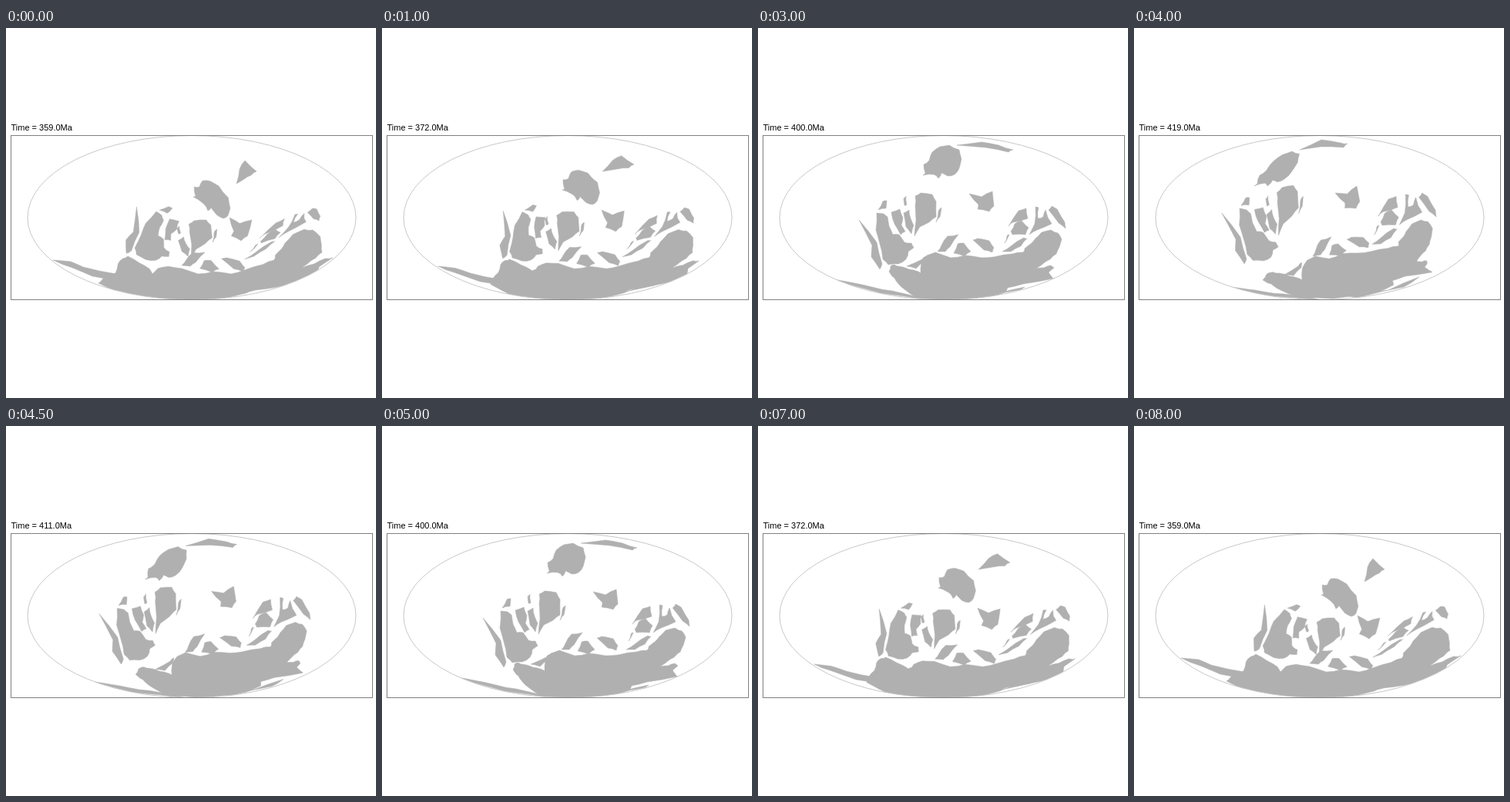
These frames come from a looping animation (480x480 px, 8.5 s). An HTML page:

```html
<!DOCTYPE html>
<html lang="en">
<head>
<meta charset="utf-8">
<style>
html, body { margin: 0; width: 100%; height: 100%; overflow: hidden; background: #fff; }
svg { display: block; width: 480px; height: 480px; }
text { font: 11px Arial, "Liberation Sans", sans-serif; }
</style>
</head>
<body>
<svg viewBox="0 0 480 480">
  <clipPath id="globe"><ellipse cx="241" cy="246" rx="213" ry="106.5"/></clipPath>
  <text id="label" x="6.5" y="133"></text>
  <g id="land" clip-path="url(#globe)" fill="#b0b0b0" stroke="#b0b0b0" stroke-width=".5" stroke-linejoin="round"></g>
  <ellipse cx="241" cy="246" rx="213" ry="106.5" fill="none" stroke="#c8c8c8"/>
  <rect x="6.5" y="139.5" width="469" height="213" fill="none" stroke="#808080"/>
</svg>
<script>
const STEP = 500;
const AGES = [359, 366, 372, 383, 389, 393, 400, 411, 419];
const YOUNG = AGES[0], MIDDLE = 400, OLD = AGES[8];

const land = document.getElementById("land");
const label = document.getElementById("label");
const shapes = [];

const parse = s => s.split(" ").map(p => p.split(",").map(Number));
const mix = (a, b, u) => a.map((v, i) => v + (b[i] - v) * u);

// Fixed pseudo-random offset in -1..1 for rough coasts.
function noise(n) {
  const s = Math.sin(n * 12.9898) * 43758.5453;
  return (s - Math.floor(s)) * 2 - 1;
}

function add(young, middle, old) {
  const el = document.createElementNS("http://www.w3.org/2000/svg", "polygon");
  land.append(el);
  shapes.push({ el, young, middle, old });
}

// Outline whose evenly spaced control points are moved; the rest follow.
function bend(outline, young, old) {
  const mid = parse(outline);
  const follow = text => {
    const ctrl = parse(text), gap = mid.length / ctrl.length;
    const shift = ctrl.map((p, i) => p.map((v, k) => v - mid[i * gap][k]));
    return mid.map((p, i) => {
      const c = Math.floor(i / gap);
      const d = mix(shift[c], shift[(c + 1) % shift.length], i % gap / gap);
      return [p[0] + d[0], p[1] + d[1]];
    });
  };
  add(follow(young), mid, follow(old));
}

// Plate moved as a whole by three anchors.
function plate(anchors, young, old, ...outlines) {
  const [a, b, c] = parse(anchors);
  const det = (b[0] - a[0]) * (c[1] - a[1]) - (b[1] - a[1]) * (c[0] - a[0]);
  const carry = text => {
    const [A, B, C] = parse(text);
    return ([x, y]) => {
      const u = ((x - a[0]) * (c[1] - a[1]) - (y - a[1]) * (c[0] - a[0])) / det;
      const v = ((b[0] - a[0]) * (y - a[1]) - (b[1] - a[1]) * (x - a[0])) / det;
      return A.map((p, k) => p + u * (B[k] - p) + v * (C[k] - p));
    };
  };
  for (const o of outlines) {
    const mid = parse(o);
    add(mid.map(carry(young)), mid, mid.map(carry(old)));
  }
}

// southern continent
bend("170,316 172,309 177,307 182,309 196,313 208,316 211,318 212,304 219,295 230,291 250,298 268,295 290,298 306,297 330,293 344,291 346,286 355,279 360,273 368,265 380,262 389,266 394,274 391,284 387,293 379,300 367,308 361,312 371,311 380,308 384,311 377,317 383,325 344,332 324,337 322,342 300,350 245,355 205,350 186,336 179,328 174,322",
  "142,318 158,296 190,319 228,312 292,319 348,301 362,279 398,262 410,291 384,311 424,298 352,336 280,351 120,331",
  "167,327 188,318 218,327 235,296 290,292 343,283 353,264 381,251 383,281 367,303 380,306 352,322 318,342 190,340");

// its long polar strips
bend("98,326 120,330 148,336 174,341 220,353 160,344 112,331",
  "61,301 84,303 100,310 143,319 150,330 112,322 86,311",
  "126,336 148,339 168,342 195,345 250,354 170,347 140,340");
bend("266,347 310,345 346,336 338,340 290,350",
  "266,345 320,341 390,314 360,331 290,349",
  "266,347 330,340 370,323 350,336 290,350");

// far northern island
bend("258,152 290,148 312,152 331,158 325,161 295,155",
  "299,202 303,183 310,172 325,186 318,191 309,196",
  "215,158 243,145 268,149 277,150 272,155 242,154");

// northern continent
plate("214,191 248,152 255,190", "243,219 276,205 282,247", "156,205 205,160 195,196",
  "214,191 217,188 215,177 222,172 226,161 236,154 248,152 261,158 264,170 261,182 255,190 246,192 238,188 234,195 228,190");

// central island
plate("274,215 304,212 300,238", "290,246 319,249 305,276", "261,214 289,205 288,234",
  "274,215 290,219 304,212 306,231 300,238 285,235 286,229");

// western continent: west side, then east side
plate("154,240 200,279 165,303", "195,238 213,291 168,289", "137,234 185,278 150,297",
  "154,240 163,241 168,245 170,257 175,268 183,268 190,278 199,279 202,285 195,290 192,300 182,306 169,307 162,300 158,280 153,262",
  "173,239 184,235 188,246 186,256 191,264 185,268 177,254",
  "131,249 154,278 161,306 158,313 147,297 148,282",
  "156,236 162,225 167,224 166,234");
plate("211,214 231,240 205,262", "244,250 267,268 242,291", "192,207 213,228 189,260",
  "204,218 211,214 226,216 231,225 231,245 222,252 210,258 203,270 205,250 204,230",
  "189,240 196,236 198,247 202,256 199,267 192,258",
  "231,252 234,238 238,233 236,245",
  "189,221 192,218 193,229 190,230");

// eastern islands
plate("338,237 399,260 330,268", "350,253 406,250 331,279", "330,222 392,245 322,256",
  "377,236 381,231 388,235 398,252 399,260 390,253",
  "360,232 364,233 363,247 370,245 373,236 376,246 381,254 362,262 352,268 359,254",
  "338,237 348,234 350,247 331,252 325,257",
  "328,264 333,254 342,250 351,259 347,268 330,268",
  "317,290 328,283 345,272 349,273 341,283 328,290",
  "320,279 323,270 326,268");

// islands off the southern coast
plate("260,268 233,290 306,285", "258,291 228,308 310,311", "256,271 232,296 305,279",
  "233,290 238,282 246,270 260,268 249,284 243,290",
  "254,292 259,280 267,279 276,290 268,296",
  "279,275 285,273 300,276 306,285 304,291 293,288",
  "193,309 213,300 218,296 216,303 205,312");

function draw(age) {
  const late = age > MIDDLE;
  const u = late ? (age - MIDDLE) / (OLD - MIDDLE) : (age - YOUNG) / (MIDDLE - YOUNG);
  for (const { el, young, middle, old } of shapes) {
    const from = late ? middle : young, to = late ? old : middle;
    const pts = from.map((p, i) => mix(p, to[i], u));
    const coast = pts.flatMap((p, i) => {
      const m = mix(p, pts[(i + 1) % pts.length], .5);
      return [p, [m[0] + noise(i + 1) * .8, m[1] + noise(i + 99) * .8]];
    });
    el.setAttribute("points", coast.map(p => p.map(v => v.toFixed(1)).join()).join(" "));
  }
  label.textContent = `Time = ${age.toFixed(1)}Ma`;
}

const last = AGES.length - 1;
const start = performance.now();
let shown = -1;

function tick(now) {
  const step = Math.floor(Math.max(0, now - start) / STEP) % (2 * last + 1);
  const index = last - Math.abs(step - last);
  if (index !== shown) draw(AGES[shown = index]);
  requestAnimationFrame(tick);
}
tick(start);
</script>
</body>
</html>
```
